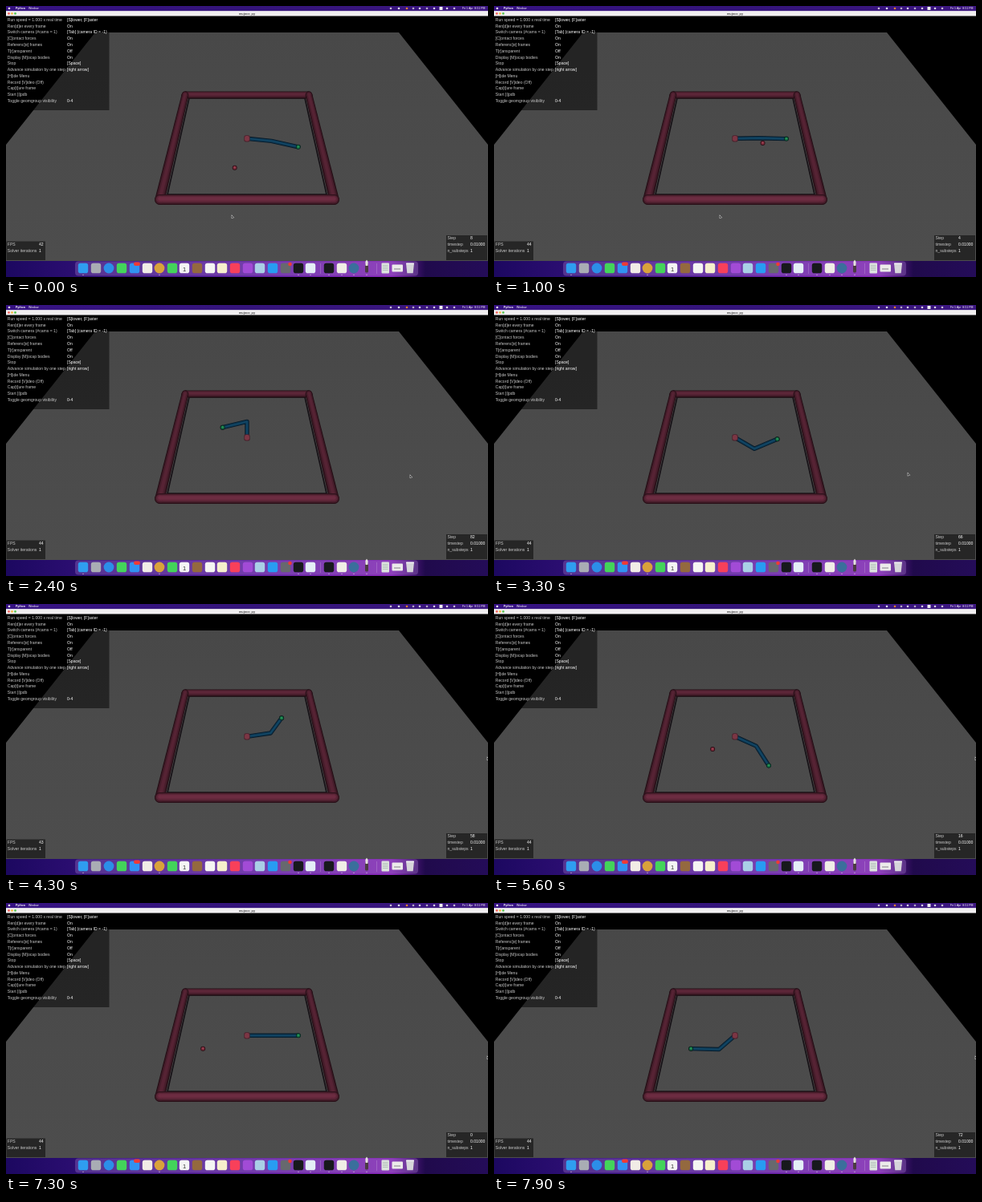
An HTML page with a canvas for the animation above (8000 ms loop, 600x338 px).

```html
<!DOCTYPE html>
<html>
<head>
<meta charset="utf-8">
<style>
html, body { margin: 0; width: 600px; height: 338px; overflow: hidden; background: #000; }
canvas { display: block; }
</style>
</head>
<body>
<canvas id="stage" width="600" height="338"></canvas>
<script>
const c = document.getElementById('stage').getContext('2d');
const LOOP = 8000, TICK = 100, EPISODE = 100;
const L1 = 1 / 3, L2 = 0.367;

// Each reaching episode: settled shoulder and elbow angles (degrees), elbow lag.
const poses = [[-65, -78, 1], [48, -114, 1], [90, 110, 1], [-40, 70, 1], [12, 49, 1],
  [120, 60, 1], [-79, -115, 1.36], [74, 64, 0.76], [-128.5, -53.5, 1]];
// Time in ms and total simulation steps.
const stepKeys = [[0, 8], [1000, 104], [2400, 282], [4300, 458], [5600, 616], [6600, 716], [7900, 872]];
const cursorKeys = [[0, 281, 263], [1400, 281, 263], [1900, 503, 214], [3200, 503, 214], [4000, 599, 193]];

const menu = [
  ['Run speed = 1.000 x real time', '[S]lower, [F]aster'],
  ['Ren[d]er every frame', 'On'],
  ['Switch camera (#cams = 1)', '[Tab] (camera ID = -1)'],
  ['[C]ontact forces', 'On'],
  ['Referenc[e] frames', 'On'],
  ['T[r]ansparent', 'Off'],
  ['Display [M]ocap bodies', 'On'],
  ['Stop', '[Space]'],
  ['Advance simulation by one step', '[right arrow]'],
  ['[H]ide Menu'],
  ['Record [V]ideo (Off)'],
  ['Cap[t]ure frame'],
  ['Start [i]pdb'],
  ['Toggle geomgroup visibility', '0-4']
];
const dock = [[96, '#2f9df0'], [112, '#a9adb4'], [128, '#2c8ee8', 1], [144, '#43d45a'], [160, '#3192f2'],
  [176, '#f1ece6'], [191, '#d9a23b', 1], [207, '#43d45a'], [222, '#f4f4f4'], [238, '#94693f'],
  [254, '#f5f5f3'], [269, '#f6efcc'], [285, '#f8405a'], [301, '#a24bd6'], [316, '#a9cfe6'],
  [332, '#289cf2'], [348, '#67696e'], [364, '#17191c'], [379, '#e4eef6'], [402, '#17191c'],
  [418, '#f0eee6'], [433, '#3a6f9c', 1]];

function lerpKeys(keys, t, i) {
  const n = keys.findIndex(k => k[0] > t);
  if (n < 0) return keys[keys.length - 1][i];
  const a = keys[n - 1], b = keys[n];
  return a[i] + (b[i] - a[i]) * (t - a[0]) / (b[0] - a[0]);
}

function poly(points, fill) {
  c.beginPath();
  points.forEach(p => c.lineTo(p[0], p[1]));
  c.closePath();
  c.fillStyle = fill;
  c.fill();
}

function rect(x, y, w, h, fill, r = 0) {
  c.beginPath();
  c.roundRect(x, y, w, h, r);
  c.fillStyle = fill;
  c.fill();
}

function dot(x, y, r, fill) {
  c.beginPath();
  c.arc(x, y, r, 0, Math.PI * 2);
  c.fillStyle = fill;
  c.fill();
}

function line(points, width, color) {
  c.beginPath();
  points.forEach(p => c.lineTo(p[0], p[1]));
  c.lineWidth = width;
  c.strokeStyle = color;
  c.stroke();
}

function text(s, x, y, size = 5.1, fill = '#fff', style = '') {
  c.font = `${style} ${size}px "Liberation Sans", Arial, sans-serif`;
  c.fillStyle = fill;
  c.fillText(s, x, y);
}

function gradient(x, y, ...stops) {
  const g = c.createLinearGradient(0, 0, x, y);
  stops.forEach(([at, color]) => g.addColorStop(at, color));
  return g;
}

// Perspective view of the arena plane, whose sides lie at -1 and 1.
function project([u, v]) {
  const w = 1 + 0.1776 * v;
  return [300 + 91.3 * u / w, (165.3 - 33.7 * v) / w];
}

function armPoints([q1, q2, lag], ease = 1) {
  const a = q1 * ease * Math.PI / 180, b = a + q2 * ease ** lag * Math.PI / 180;
  const elbow = [L1 * Math.cos(a), L1 * Math.sin(a)];
  const tip = [elbow[0] + L2 * Math.cos(b), elbow[1] + L2 * Math.sin(b)];
  return [[0, 0], elbow, tip].map(project);
}

// A shaded rod whose radius shrinks from one end to the other, lit from above.
function rod([x1, y1], [x2, y2], r1, r2, light) {
  const d = Math.hypot(x2 - x1, y2 - y1), nx = (y1 - y2) / d, ny = (x2 - x1) / d;
  [[1, 10], [0.86, 17], [0.64, 23], [0.34, 27]].forEach(([k, tone]) => {
    const a = r1 * k, b = r2 * k, lift = (1 - k) * 1.6;
    const color = `hsl(340 42% ${tone * light}%)`;
    poly([[x1 + nx * a, y1 + ny * a - lift], [x2 + nx * b, y2 + ny * b - lift],
      [x2 - nx * b, y2 - ny * b - lift], [x1 - nx * a, y1 - ny * a - lift]], color);
    dot(x1, y1 - lift, a, color);
    dot(x2, y2 - lift, b, color);
  });
}

function drawScene(steps) {
  rect(0, 12, 600, 306, '#000');
  poly([[111, 33], [489, 33], [600, 173], [600, 318], [0, 318], [0, 173]],
    gradient(0, 318, [0.1, '#484848'], [0.55, '#4b4b4b'], [1, '#4d4d4d']));

  const nl = [191.5, 241.5], nr = [408.5, 241.5], fl = [223, 111], fr = [377, 111];
  line([[201, 235], [228, 115], [372, 115], [399, 235], [201, 235]], 1.6, '#151015');
  rod(fl, fr, 4.4, 4.4, 0.95);
  rod(nl, fl, 6.2, 4.4, 0.88);
  rod(nr, fr, 6.2, 4.4, 0.88);
  rod(nl, nr, 6.5, 6.5, 1.1);

  const pose = poses[Math.floor(steps / EPISODE) % poses.length];
  const x = Math.min(1, steps % EPISODE / 36);
  const arm = armPoints(pose, x * x * (3 - 2 * x));
  const goal = armPoints(pose)[2];
  dot(...goal, 3, '#2a0d14');
  dot(...goal, 2.2, '#7c2b3b');
  dot(goal[0], goal[1] - 0.3, 1, '#a04857');

  c.lineCap = c.lineJoin = 'round';
  line(arm, 5.4, '#071a28');
  line(arm, 3.8, '#0c344e');
  line(arm, 1.6, '#114766');
  rect(296.3, 161.2, 7.4, 8.4, '#4a212c', 2.4);
  rect(297.1, 162, 5.8, 6.4, '#7c3644', 2);
  const tip = arm[2];
  dot(...tip, 3, '#08261f');
  dot(...tip, 2.2, '#157044');
  dot(tip[0], tip[1] - 0.3, 1, '#2d9c5c');
}

function drawOverlays(frame, steps) {
  const shade = 'rgba(0,0,0,.5)', dim = '#c8c8c8';
  rect(0, 12, 128.5, 118, shade);
  menu.forEach(([label, value], i) => {
    const y = 18.9 + i * 7.77;
    text(label, 1.8, y, 5.1, dim);
    if (value) text(value, 76, y);
  });
  rect(0.5, 293.5, 48.5, 23.5, shade);
  const fps = frame === 0 ? 42 : frame % 20 === 3 ? 43 : 44;
  [['FPS', fps], ['Solver iterations', 1]].forEach(([label, value], i) => {
    text(label, 1.8, 298.8 + i * 7.8, 5.1, dim);
    text(value, 41, 298.8 + i * 7.8);
  });
  rect(548, 286, 51, 31, shade);
  [['Step', steps % EPISODE], ['timestep', '0.01000'], ['n_substeps', 1]].forEach(([label, value], i) => {
    text(label, 549.5, 291 + i * 7.8, 5.1, dim);
    text(value, 578, 291 + i * 7.8);
  });
}

function drawDesktop() {
  rect(0, 0, 600, 6.5, gradient(600, 0, [0, '#361282'], [0.5, '#34147a'], [1, '#3c1680']));
  dot(4, 3, 1.3, '#eee');
  text('Python', 12, 4.3, 3.5, '#fff', 'bold');
  text('Window', 28, 4.3, 3.5);
  [[479, '#c9bed4'], [489, '#dfe3ee'], [499, '#e0842c'], [507, '#b5a9c2'], [515, '#d9d2e2'],
    [524, '#b5a9c2'], [533, '#d9d2e2'], [549, '#d9d2e2'], [558, '#c9bed4']]
    .forEach(([x, color]) => dot(x, 3, 1.3, color));
  rect(539.5, 1, 4, 4, '#eee', 0.5);
  text('Fri 1 Apr  8:51 PM', 568, 4.3, 3.5);

  rect(0, 6.3, 600, 6.2, '#f1eff1');
  ['#f2625a', '#f5bd45', '#59c653'].forEach((color, i) => dot(3.5 + i * 4, 9.4, 1.4, color));
  c.textAlign = 'center';
  text('mujoco_py', 300, 10.7, 3.8, '#444', 'bold');
  c.textAlign = 'left';

  rect(0, 318, 600, 20, gradient(600, 0, [0, '#1c0860'], [0.15, '#2c0e72'], [0.5, '#5a1c9c'],
    [0.8, '#8424b4'], [0.87, '#200a4c'], [1, '#240c58']));
  rect(86, 318.5, 427, 18, 'rgba(160,120,200,.35)', 4);
  dock.forEach(([x, color, round]) => {
    if (round) dot(x, 327, 6.4, color);
    else rect(x - 6.2, 320.8, 12.4, 12.4, color, 2.8);
  });
  c.textAlign = 'center';
  text('1', 222, 331, 7.5, '#333');
  c.textAlign = 'left';
  rect(159, 319.6, 8, 4.4, '#ef3b35', 2.2);
  dot(353.5, 322, 2.3, '#ef3b35');
  [391, 461].forEach(x => rect(x, 321, 0.6, 13, 'rgba(255,255,255,.3)'));
  rect(447, 322, 4, 10.5, '#4b3b42', 1.5);
  poly([[449, 316.5], [450.6, 319], [450.4, 324], [447.6, 324], [447.4, 319]], '#e5e1df');
  rect(467.5, 320.5, 9.5, 13, '#dde4df', 1);
  [323, 325, 327, 329].forEach(y => rect(469, y, 6.5, 0.6, '#9aa9a2'));
  rect(480.5, 322.5, 13.5, 9, '#ecebea', 1);
  rect(483, 327, 8, 2, '#b9b7ba');
  poly([[498, 321], [508, 321], [506.7, 333.2], [499.3, 333.2]], '#d6d5da');
  rect(498, 320.6, 10, 1.5, '#f4f4f6', 0.7);
  [96, 191, 364, 379, 402, 418, 433, 449].forEach(x => dot(x, 335.4, 0.6, '#d8cde0'));
}

function drawCursor(t) {
  const x = lerpKeys(cursorKeys, t, 1), y = lerpKeys(cursorKeys, t, 2);
  const arrow = [[x, y - 2], [x, y + 2], [x + 1, y + 1.1], [x + 2.8, y + 0.9]];
  poly(arrow, '#111');
  line([...arrow, arrow[0]], 0.6, '#ddd');
}

function draw(now) {
  const frame = Math.floor(now % LOOP / TICK), t = frame * TICK;
  const steps = 2 * Math.round(lerpKeys(stepKeys, t, 1) / 2);
  drawScene(steps);
  drawOverlays(frame, steps);
  drawDesktop();
  drawCursor(t);
}

const start = performance.now();
function loop() {
  draw(performance.now() - start);
  requestAnimationFrame(loop);
}
loop();
</script>
</body>
</html>
```
